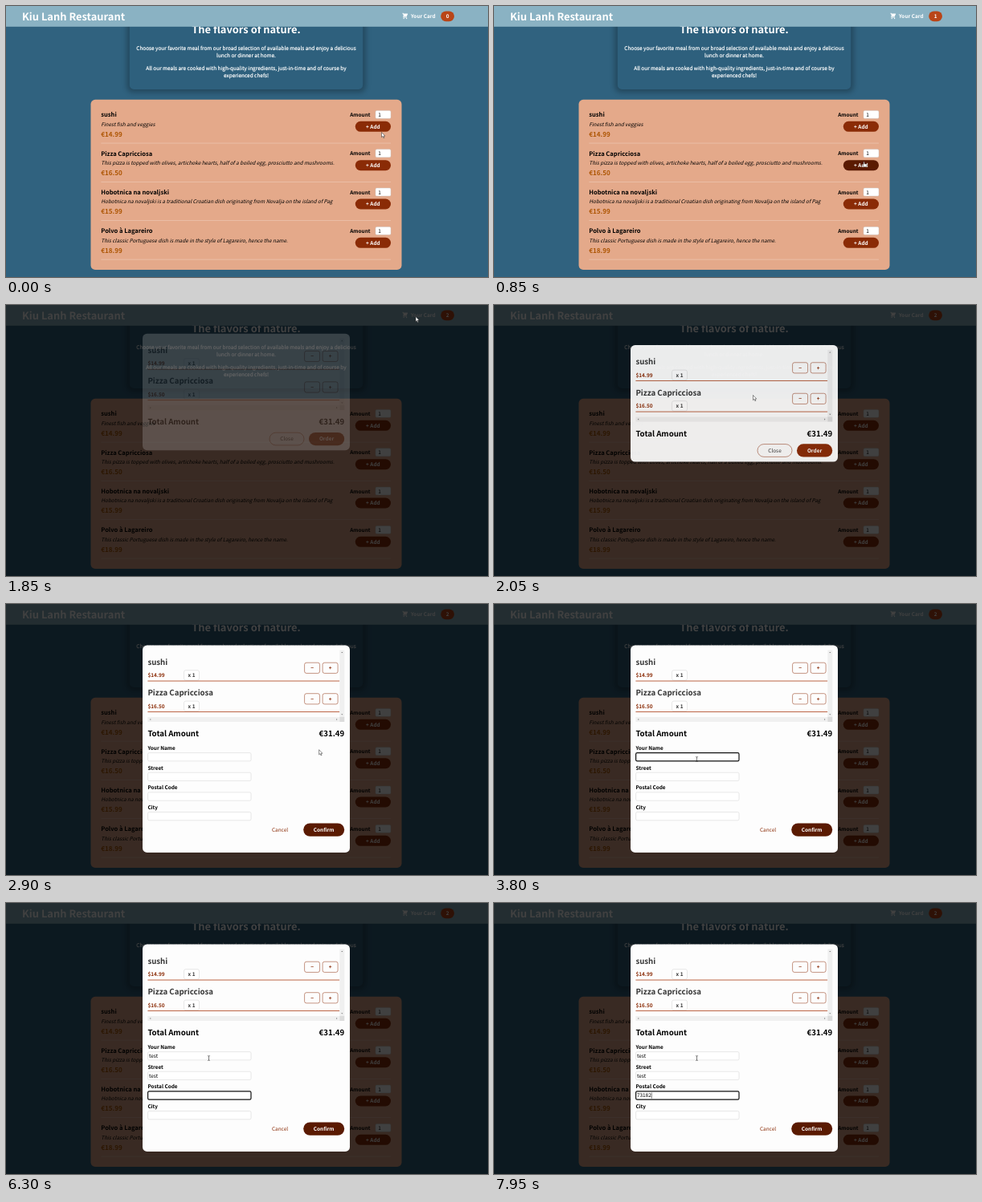
An HTML page that plays this animation: 600x338 px, repeating every 8 s.

```html
<!DOCTYPE html>
<html lang="en">
<head>
<meta charset="utf-8">
<title>Restaurant order</title>
<style>
  html, body { margin: 0; width: 100%; height: 100%; overflow: hidden; background: #30627f; }
  svg { display: block; width: 600px; height: 338px; }
  text {
    font: 6.45px "Noto Sans CJK JP", "Noto Sans CJK SC", "Noto Sans CJK", "Noto Sans", sans-serif;
    text-rendering: geometricPrecision;
    white-space: pre;
  }
  .b { font-weight: 700; }
  .i { font-style: italic; }
  .m { text-anchor: middle; }
  .e { text-anchor: end; }
  .h1 { font-size: 12.9px; font-weight: 700; }
  .h2 { font-size: 9.67px; font-weight: 700; }
  .h3 { font-size: 7.55px; font-weight: 700; }
  .price { font-size: 8.06px; font-weight: 700; fill: #ad5502; }
  .w { fill: #fff; }
  .intro { stroke: #fff; stroke-width: .2; }
  .rust { fill: #8a2b06; }
  .soft { fill: #363636; }
  .btn { fill: #8a2b06; }
  .btn.hover, .dark { fill: #5a1a01; }
  .line { fill: none; stroke: #8a2b06; stroke-width: .5; }
  .field { fill: #fff; stroke: #ccc; stroke-width: .45; }
  .field.focus { stroke: #101010; stroke-width: 1.2; }
  .bar { fill: #f0f0f0; }
</style>
</head>
<body>
<svg viewBox="0 0 600 338" xmlns="http://www.w3.org/2000/svg">
  <defs>
    <filter id="blur" x="-20%" y="-30%" width="140%" height="160%"><feGaussianBlur stdDeviation="3.4"/></filter>
  </defs>
  <rect width="600" height="338" fill="#30627f"/>

  <g id="summary">
    <rect x="150" y="-14" width="298" height="122" rx="8" opacity=".25" filter="url(#blur)"/>
    <rect x="153.8" y="-10" width="290.4" height="114" rx="5.6" fill="#2e607d"/>
  </g>

  <rect x="105.5" y="116.8" width="387" height="212.2" rx="5.6" fill="#e4a98a"/>
  <g id="meals"></g>

  <rect width="600" height="25.8" fill="#8ab2c3"/>
  <text x="20" y="18" class="h1 w">Kiu Lanh Restaurant</text>
  <path transform="translate(492.3 8.3) scale(.4355)" fill="#fff" d="M3 1a1 1 0 000 2h1.22l1.67 6.69-.9.9C3.74 11.85 4.63 14 6.41 14H15a1 1 0 000-2H6.41l1-1H14a1 1 0 00.9-.55l3-6A1 1 0 0017 3H6.28l-.31-1.24A1 1 0 005 1zM16 16.5a1.5 1.5 0 11-3 0 1.5 1.5 0 013 0zM6.5 18a1.5 1.5 0 100-3 1.5 1.5 0 000 3z"/>
  <text x="504" y="15.2" class="b w">Your Card</text>
  <g id="badge">
    <rect x="541.2" y="6.4" width="16.8" height="12.8" rx="6.4" fill="#b94517"/>
    <text id="count" x="549.6" y="15.2" class="b w m">0</text>
  </g>

  <rect id="backdrop" width="600" height="338" opacity=".75"/>

  <g id="modal">
    <rect id="sheet" x="170" y="51.5" width="258" height="145.5" rx="5.6" fill="#fdfdfd"/>
    <g id="cart"></g>
    <g class="bar">
      <rect x="415.3" y="57.5" width="6" height="83.3"/>
      <rect x="176.4" y="141" width="238.9" height="6"/>
      <rect x="415.3" y="140.8" width="6" height="6.2" fill="#dcdcdc"/>
    </g>
    <path fill="#777" d="M417.2 61l1.1-1.3 1.1 1.3zM417.2 137.3l1.1 1.3 1.1-1.3zM180.2 142.9l-1.3 1.1 1.3 1.1zM411.2 142.9l1.3 1.1-1.3 1.1z"/>
    <text x="176.4" y="165" class="h2">Total Amount</text>
    <text x="421.2" y="165" class="h2 e">€31.49</text>

    <g id="actions">
      <rect x="328" y="175" width="43" height="15.8" rx="7.9" class="line"/>
      <text x="349.5" y="185.3" class="m soft">Close</text>
      <rect id="order" x="377" y="174.8" width="44.2" height="16.2" rx="8.1" class="btn"/>
      <text x="399.1" y="185.3" class="b w m">Order</text>
    </g>

    <g id="form">
      <g id="fields"></g>
      <rect id="caret" width=".5" height="7.4"/>
      <text x="341" y="284" class="m rust">Cancel</text>
      <rect x="370.2" y="273.4" width="51" height="16.4" rx="8.2" class="dark"/>
      <text x="395.7" y="284" class="b w m">Confirm</text>
    </g>
  </g>

  <g id="pointer">
    <path id="arrow" d="M0 0v6.2l1.4-1.3 1 2.3 1-.4-1-2.2h1.9z" fill="#fff" stroke="#222" stroke-width=".5"/>
    <path id="hand" d="M-.5 0q.6-.7 1.1 0v2.2l2.5.6q.6.2.5 1l-.5 2.4h-3.2l-1.9-2.5q.2-.7 1.1-.2l.4.4z" fill="#fff" stroke="#222" stroke-width=".4"/>
    <path id="beam" d="M-1.3-3q1.1 0 1.3.5.2-.5 1.3-.5M0-2.5v5M-1.3 3q1.1 0 1.3-.5.2.5 1.3.5" fill="none" stroke="#222" stroke-width=".6"/>
  </g>
</svg>

<script>
const LOOP = 8000;
const $ = id => document.getElementById(id);
const text = (x, y, cls, s) => `<text x="${x}" y="${y}" class="${cls}">${s}</text>`;
const box = (x, y, w, h, r, attrs) =>
  `<rect x="${x}" y="${y}" width="${w}" height="${h}" rx="${r}" ${attrs}/>`;

$('summary').innerHTML += text(299, 33.6, 'h1 w m', 'The flavors of nature.') + [
  [55, 'Choose your favorite meal from our broad selection of available meals and enjoy a delicious'],
  [64.3, 'lunch or dinner at home.'],
  [79.8, 'All our meals are cooked with high-quality ingredients, just-in-time and of course by'],
  [89.1, 'experienced chefs!']
].map(([y, s]) => text(299, y, 'w m intro', s)).join('');

const meals = [
  ['sushi', 'Finest fish and veggies', '14.99'],
  ['Pizza Capricciosa', 'This pizza is topped with olives, artichoke hearts, half of a boiled egg, prosciutto and mushrooms.', '16.50'],
  ['Hobotnica na novaljski', 'Hobotnica na novaljski is a traditional Croatian dish originating from Novalja on the island of Pag', '15.99'],
  ['Polvo à Lagareiro', 'This classic Portuguese dish is made in the style of Lagareiro, hence the name.', '18.99']
];

$('meals').innerHTML = meals.map(([name, about, price], k) =>
  `<g transform="translate(0 ${k * 48.35})">` +
  text(118.3, 138.3, 'h3', name) +
  text(118.3, 149.6, 'i', about) +
  text(118.3, 162.5, 'price', '€' + price) +
  text(428.2, 137.9, 'b', 'Amount') +
  box(460, 130.4, 19, 9.9, 1.6, 'class="field"') +
  text(463.3, 137.9, '', '1') +
  box(434.8, 143.8, 44.2, 13, 6.5, `id="add${k}" class="btn"`) +
  text(456.9, 152.7, 'b w m', '+ Add') +
  box(118.3, 170.8, 360.7, .5, 0, 'fill="#eed0c0"') +
  '</g>').join('');

$('cart').innerHTML = meals.slice(0, 2).map(([name, , price], k) =>
  `<g transform="translate(0 ${k * 38.5})">` +
  text(176.4, 75.5, 'h2 soft', name) +
  text(176.4, 91.2, 'b rust', '$' + price) +
  box(221.5, 82.6, 19, 12.6, 2.4, 'class="field"') +
  text(231, 91.2, 'b soft m', 'x 1') +
  [['−', 371.6], ['+', 394.1]].map(([s, x]) =>
    box(x, 73.2, 19, 13.2, 2.4, 'class="line"') + text(x + 9.5, 82.2, 'b rust m', s)).join('') +
  box(176.4, 95.6, 238.9, .85, 0, 'fill="#b04a25"') +
  '</g>').join('');

$('fields').innerHTML = ['Your Name', 'Street', 'Postal Code', 'City'].map((label, k) => {
  const y = k * 24.65;
  return text(176.4, 181.9 + y, 'b', label) +
    box(176.6, 185.6 + y, 128.4, 10.3, 1.6, `id="box${k}" class="field"`) +
    text(177.9, 193.1 + y, '', '').replace('<text', `<text id="val${k}"`);
}).join('');

// Focus time and key times of each form field
const inputs = [
  { from: 3290, word: 'test', keys: [4360, 4450, 4560, 4680] },
  { from: 4950, word: 'test', keys: [5050, 5110, 5180, 5240] },
  { from: 5790, word: '73182', keys: [7080, 7300, 7500, 7640, 7860] }
];

// Pointer stops: time, x, y
const route = [
  [0, 467.5, 157.5], [50, 467.5, 157.5], [150, 460, 150], [420, 460, 150],
  [760, 460.5, 194.5], [1200, 460.5, 194.5], [1650, 510, 14.5], [1860, 510, 14.5],
  [2050, 322.5, 112.5], [2400, 398, 181], [2850, 398, 181],
  [3200, 252.5, 193.5], [LOOP, 252.5, 193.5]
];
const shapes = [
  [0, 'arrow'], [90, 'hand'], [490, 'arrow'], [690, 'hand'], [1240, 'arrow'],
  [1600, 'hand'], [1800, 'arrow'], [2350, 'hand'], [2700, 'arrow'], [3180, 'beam']
];
const hovers = [['add0', 90, 490], ['add1', 690, 1240], ['order', 2350, 2700]];
const clicks = [250, 1000];
const OPEN = 1800, FORM = 2700;

const mix = (a, b, p) => a + (b - a) * p;
const show = (id, on) => $(id).setAttribute('visibility', on ? 'inherit' : 'hidden');

// Value of a piecewise track [[time, ...values]] at time t
function along(track, t, ease = p => p) {
  const k = Math.max(1, track.findIndex(s => s[0] >= t));
  const [a, b] = [track[k - 1], track[k]];
  const p = ease((t - a[0]) / (b[0] - a[0]));
  return a.slice(1).map((v, j) => mix(v, b[j + 1], p));
}

// cubic-bezier(0, 0, .58, 1)
function easeOut(x) {
  let lo = 0, hi = 1;
  for (let k = 0; k < 20; k++) {
    const s = (lo + hi) / 2;
    if (1.74 * s * s - .74 * s ** 3 < x) lo = s; else hi = s;
  }
  return 3 * lo * lo - 2 * lo ** 3;
}

const smooth = p => p * p * (3 - 2 * p);
const bump = [[0, 1], [30, .9], [90, 1.1], [150, 1.15], [300, 1]];

function drawBadge(t) {
  const n = clicks.filter(c => t >= c).length;
  const age = n ? t - clicks[n - 1] : 300;
  const s = age < 300 ? along(bump, age, easeOut)[0] : 1;
  $('count').textContent = n;
  $('badge').setAttribute('transform', `translate(549.6 12.8) scale(${s}) translate(-549.6 -12.8)`);
}

function drawModal(t) {
  const p = easeOut(Math.min(1, Math.max(0, (t - OPEN - 17) / 300)));
  const form = t >= FORM;
  show('backdrop', t >= OPEN);
  show('modal', t >= OPEN);
  $('modal').setAttribute('opacity', p);
  $('modal').setAttribute('transform', `translate(0 ${-19.35 * (1 - p)})`);
  $('sheet').setAttribute('height', form ? 258.5 : 145.5);
  show('actions', !form);
  show('form', form);
}

function drawForm(t) {
  const active = inputs.filter(f => t >= f.from).length - 1;
  inputs.forEach((f, k) => {
    const typed = f.keys.filter(key => t >= key).length;
    const val = $('val' + k);
    val.textContent = f.word.slice(0, typed);
    $('box' + k).classList.toggle('focus', k === active);
    if (k !== active) return;
    const last = typed ? f.keys[typed - 1] : f.from;
    const caret = $('caret');
    caret.setAttribute('x', 178 + (typed ? val.getComputedTextLength() : 0));
    caret.setAttribute('y', 187.1 + k * 24.65);
    caret.setAttribute('opacity', (t - last) % 1000 < 500 ? 1 : 0);
  });
  if (active < 0) $('caret').setAttribute('opacity', 0);
}

function drawPointer(t) {
  const [x, y] = along(route, t, smooth);
  const shape = shapes.filter(s => t >= s[0]).pop()[1];
  $('pointer').setAttribute('transform', `translate(${x} ${y})`);
  ['arrow', 'hand', 'beam'].forEach(id => show(id, id === shape));
  hovers.forEach(([id, a, b]) => $(id).classList.toggle('hover', t >= a && t < b));
}

function draw(t) {
  drawBadge(t);
  drawModal(t);
  drawForm(t);
  drawPointer(t);
}

const start = performance.now();
function tick() {
  draw((performance.now() - start) % LOOP);
  requestAnimationFrame(tick);
}
draw(0);
requestAnimationFrame(tick);
</script>
</body>
</html>
```
